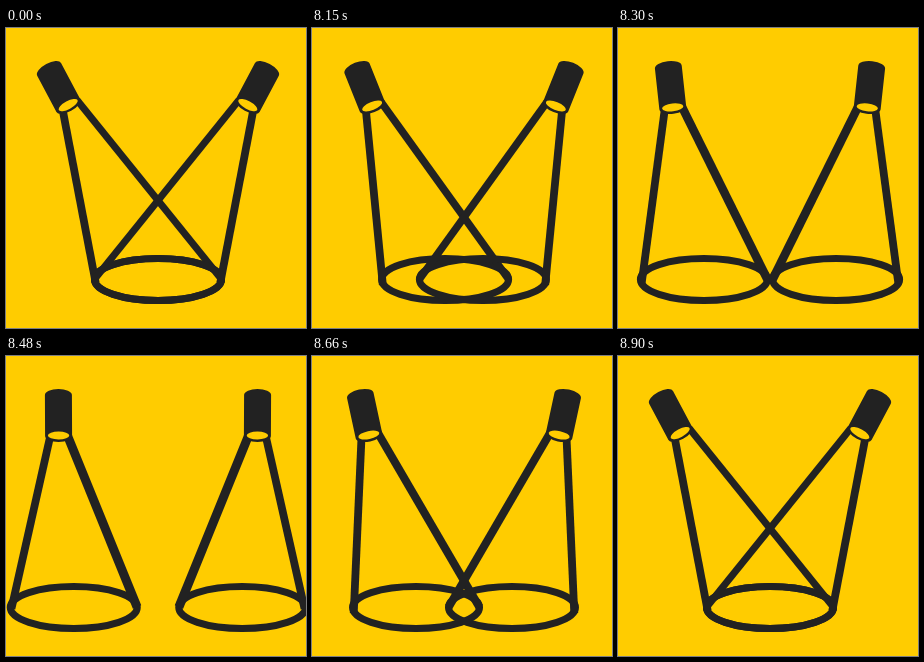
Recreate the animation shown at these times as an HTML page. Size 300x300 px, loop 8930 ms.

```html
<!DOCTYPE html>
<html lang="en">
<head>
<meta charset="utf-8">
<title>Spotlights</title>
<style>
  html, body { margin: 0; height: 100%; overflow: hidden; background: #fc0; }
  svg { display: block; width: 100vw; height: 100vh; }
</style>
</head>
<body>
<svg viewBox="0 0 300 300">
  <defs>
    <g id="light" fill="none" stroke="#222">
      <ellipse id="spot" cy="251.5" rx="63.5" ry="21" stroke-width="7"/>
      <line id="outer" stroke-width="7.8"/>
      <line id="inner"/>
      <g id="lamp" fill="#222" stroke="none">
        <path d="M-13.5-20a13.5 6 0 0 1 27 0V21a13.5 6 0 0 1-27 0z"/>
        <ellipse cy="20.5" rx="10.7" ry="4" fill="#fc0"/>
      </g>
    </g>
  </defs>
  <use href="#light"/>
  <use href="#light" transform="matrix(-1 0 0 1 304 0)"/>
</svg>
<script>
  const LOOP = 8930, START = 8000, HALF = 450, STEP = 30;
  const $ = id => document.getElementById(id);
  const mix = (a, b, k) => a + (b - a) * k;
  const ease = u => u < 0.5 ? 2 * u * u : 1 - 2 * (1 - u) ** 2;

  function set(id, attrs) {
    for (const name in attrs) $(id).setAttribute(name, attrs[name]);
  }

  // swing: 0 = beams crossed on one spot, 1 = lamps pointing straight down
  function pose(swing) {
    const cx = mix(152, 67, swing);
    set('spot', { cx });
    set('lamp', { transform: `translate(52.5 59) rotate(${mix(-28, 0, swing)})` });

    // the outer beam is a rigid bar, so its foot rises as it tilts
    const x1 = mix(56.3, 44.4, swing), y1 = mix(80, 79, swing), x2 = cx - 62.3;
    set('outer', { x1, y1, x2, y2: y1 + Math.sqrt(178 ** 2 - (x2 - x1) ** 2) });

    set('inner', {
      x1: mix(71, 61.5, swing), y1: mix(72, 80, swing),
      x2: cx + 63.3, y2: 251, 'stroke-width': mix(7, 9, swing)
    });
  }

  function frame() {
    const t = Math.max(0, performance.now() % LOOP - START);
    const stepped = Math.floor(t / STEP) * STEP;
    pose(ease(1 - Math.abs(1 - stepped / HALF)));
    requestAnimationFrame(frame);
  }
  frame();
</script>
</body>
</html>
```
